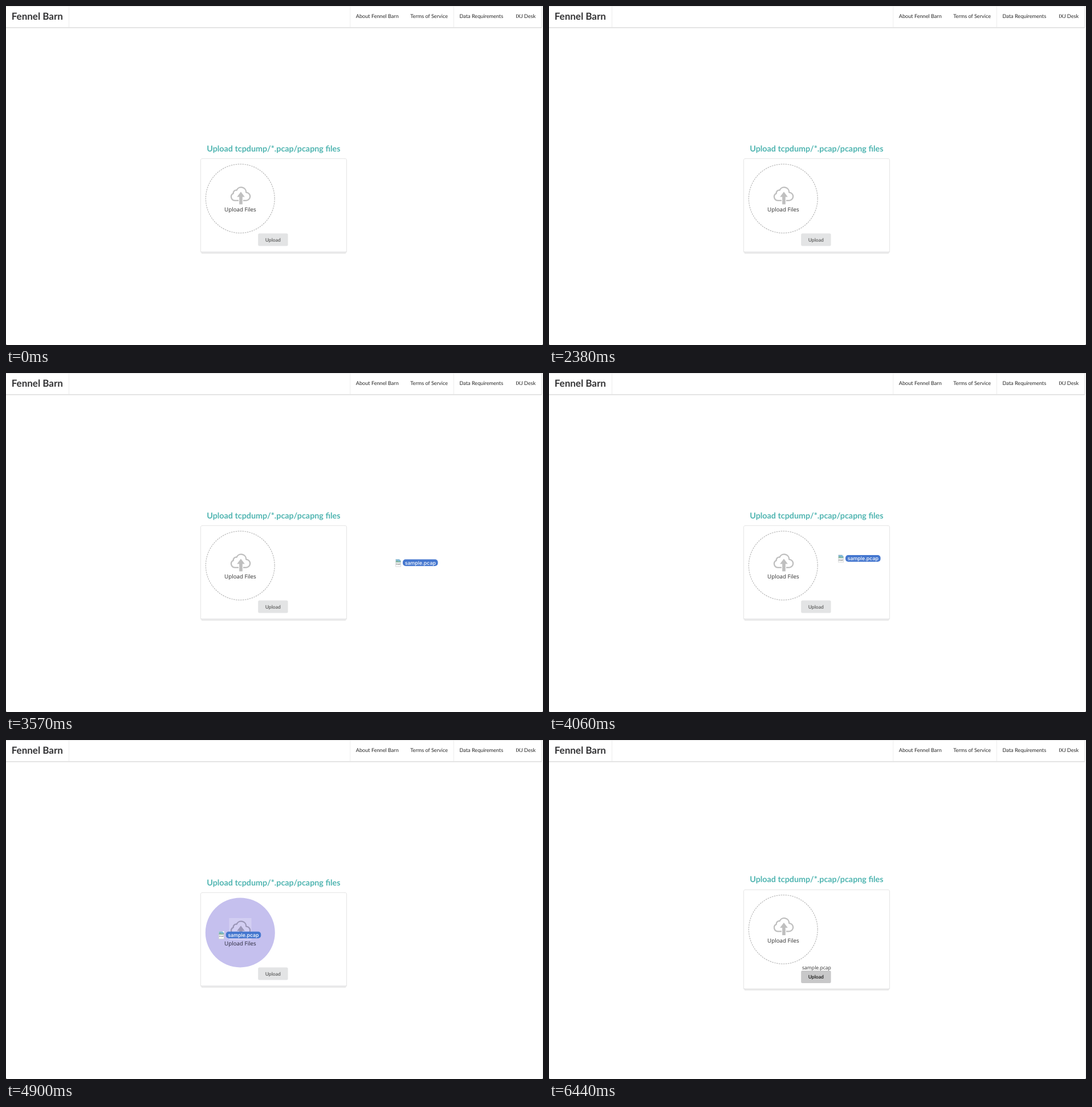
An HTML page with a canvas that plays this animation: 942x594 px, repeating every 6650 ms.

```html
<!DOCTYPE html>
<html lang="en">
<head>
<meta charset="utf-8">
<title>Upload demo</title>
<style>
  html, body { margin: 0; width: 100%; height: 100%; overflow: hidden; background: #fff; }
  canvas { display: block; width: 942px; height: 594px; }
</style>
</head>
<body>
<canvas id="stage"></canvas>
<script>
const W = 942, H = 594, LOOP = 6650, STEP = 70;
const DRAG_START = 3080, HOVER_START = 4480, DROP = 5180;
const BUTTON_HOVER = 6020, BUTTON_PRESS = 6440;
const LATO = 'Lato, sans-serif', OPEN = '"Open Sans", sans-serif', INTER = 'Inter, sans-serif';

// Drag path: time, x and y of the file icon's left middle.
const PATH = [
  [3080, 930, 331], [3570, 683, 332.5], [3710, 650.5, 331], [4060, 507, 325],
  [4410, 412.3, 336.3], [4900, 372.7, 341.7], [5180, 371, 342]
];

const canvas = document.getElementById('stage');
const ctx = canvas.getContext('2d');
const ratio = window.devicePixelRatio || 1;
canvas.width = W * ratio;
canvas.height = H * ratio;

function text(str, x, y, font, color, align = 'left') {
  ctx.font = font;
  ctx.fillStyle = color;
  ctx.textAlign = align;
  ctx.fillText(str, x, y);
}

function rect(x, y, w, h, color) {
  ctx.fillStyle = color;
  ctx.fillRect(x, y, w, h);
}

function round(x, y, w, h, r) {
  ctx.beginPath();
  ctx.roundRect(x, y, w, h, r);
}

// Monotone cubic through the path points, so the drag never overshoots.
function pathAt(t, axis) {
  const slope = i => (PATH[i + 1][axis] - PATH[i][axis]) / (PATH[i + 1][0] - PATH[i][0]);
  const tangent = i => {
    if (i === 0) return slope(0);
    if (i === PATH.length - 1) return 0;
    const a = slope(i - 1), b = slope(i);
    return a * b > 0 ? 2 * a * b / (a + b) : 0;
  };
  let i = 0;
  while (i < PATH.length - 2 && t >= PATH[i + 1][0]) i++;
  const span = PATH[i + 1][0] - PATH[i][0];
  const u = (t - PATH[i][0]) / span, v = 1 - u;
  return PATH[i][axis] * (1 + 2 * u) * v * v + tangent(i) * span * u * v * v
    + PATH[i + 1][axis] * u * u * (3 - 2 * u) - tangent(i + 1) * span * u * u * v;
}

function drawMenu() {
  rect(0, 0, W, 1, '#e4e4e4');
  rect(941, 0, 1, H, '#ececec');
  rect(0, 37, 940, 1, '#e3e3e3');
  rect(0, 38, 940, 1, '#e6e6e6');
  for (const x of [110, 603.4, 785]) rect(x, 1, 0.8, 36, '#e8e8e8');
  rect(939.3, 1, 0.8, 36, '#dadadb');
  for (const x of [0, W - 1]) rect(x, H - 1, 1, 1, '#777');

  text('Fennel Barn', 9.7, 24, '700 17px ' + LATO, '#333335');
  const font = '400 9.15px ' + LATO, color = '#262626';
  text('About Fennel Barn', 613.8, 21.2, font, color);
  text('Terms of Service', 709.3, 21.2, font, color);
  text('Data Requirements', 795.5, 21.2, font, color);
  text('IXJ Desk', 894.2, 21.2, font, color);
}

function drawCard(top, bottom) {
  round(341.5, top + 0.5, 256, bottom - top, 2.5);
  ctx.strokeStyle = '#e2e2e3';
  ctx.lineWidth = 0.9;
  ctx.stroke();
  rect(342, bottom - 2, 255, 1, '#e4e4e5');
  rect(343, bottom, 253, 1, '#d2d2d3');
  rect(343, bottom + 1, 253, 1, '#f4f4f4');
}

function drawCloud(color) {
  ctx.strokeStyle = ctx.fillStyle = color;
  ctx.lineWidth = 2.3;
  ctx.lineCap = 'butt';
  ctx.lineJoin = 'round';
  ctx.stroke(new Path2D('M408 340.8H401.3A6.5 6.5 0 0 1 398.8 328.4A5 5 0 0 1 404.6 322.8' +
    'A8.7 8.7 0 0 1 421.2 326.6A7.1 7.1 0 0 1 421 340.8H416'));
  ctx.fill(new Path2D('M412 325.6L418.8 334.4H414.8V347.6H409.2V334.4H405.2Z'));
}

function drawDropZone(dy, over) {
  ctx.save();
  ctx.translate(0, dy);
  ctx.beginPath();
  ctx.arc(410.8, 337.4, over ? 61 : 60.4, 0, Math.PI * 2);
  if (over) {
    ctx.fillStyle = '#c5c0ee';
    ctx.fill();
    rect(391.4, 312, 39.2, 38.4, '#d2cef2');
  } else {
    ctx.setLineDash([2.5, 1.5]);
    ctx.strokeStyle = '#bcbcbc';
    ctx.lineWidth = 1.25;
    ctx.stroke();
    ctx.setLineDash([]);
  }
  drawCloud(over ? '#9b97b8' : '#bfbfbf');
  text('Upload Files', 410.9, 360.2, '400 9.8px ' + OPEN, over ? '#29283a' : '#303030', 'center');
  ctx.restore();
}

function drawButton(y, fill, color) {
  round(442.2, y, 52.4, 21.8, 2.5);
  ctx.fillStyle = fill;
  ctx.fill();
  text('Upload', 468.3, y + 14, '700 8.57px ' + LATO, color, 'center');
}

function drawFile(x, y) {
  ctx.save();
  ctx.translate(x, y);
  rect(0.4, -6.5, 9.4, 13.6, '#c9cbcc');
  rect(0.9, -6, 8.4, 12.6, '#f6f7f7');
  rect(0.9, -6, 8.4, 5.2, '#7fb9d8');
  ctx.fillStyle = '#86b59a';
  ctx.fill(new Path2D('M0.9 -0.8V-3L3.5 -4L6 -2L9.3 -3.2V-0.8Z'));
  ctx.fillStyle = '#fff';
  ctx.fill(new Path2D('M6.6 -6.6H9.9V-3.4Z'));
  text('PCAP', 5.1, 3.6, '700 3px ' + INTER, '#777', 'center');
  round(13, -6, 61.6, 11.8, 5);
  ctx.fillStyle = '#4577cf';
  ctx.fill();
  text('sample.pcap', 43.8, 3, '500 8.8px ' + INTER, '#fff', 'center');
  ctx.restore();
}

function draw(time) {
  const t = Math.floor(time % LOOP / STEP) * STEP;
  const dropped = t >= DROP;
  const over = t >= HOVER_START && !dropped;
  const shift = dropped ? 5.5 : 0;

  ctx.setTransform(ratio, 0, 0, ratio, 0, 0);
  ctx.textRendering = 'geometricPrecision';
  rect(0, 0, W, H, '#fff');
  drawMenu();
  text('Upload tcpdump/*.pcap/pcapng files', 469.4, 255 - shift * 1.1,
    '700 14.35px ' + LATO, '#50b5b1', 'center');
  drawCard(Math.ceil(267 - shift), Math.floor(432 + shift));
  drawDropZone(-shift, over);

  let fill = '#e3e4e5', color = '#6a6a6a';
  if (t >= BUTTON_PRESS) [fill, color] = ['#c8c8c9', '#252525'];
  else if (t >= BUTTON_HOVER) [fill, color] = ['#cacbcd', '#333'];
  drawButton(398.6 + shift, fill, color);

  if (dropped) text('sample.pcap', 469.4, 402.2, '400 8.6px ' + OPEN, '#303030', 'center');
  else if (t >= DRAG_START) drawFile(pathAt(t, 1), pathAt(t, 2));
}

const start = performance.now();
function tick() {
  draw(performance.now() - start);
  requestAnimationFrame(tick);
}
tick();
</script>
</body>
</html>
```
